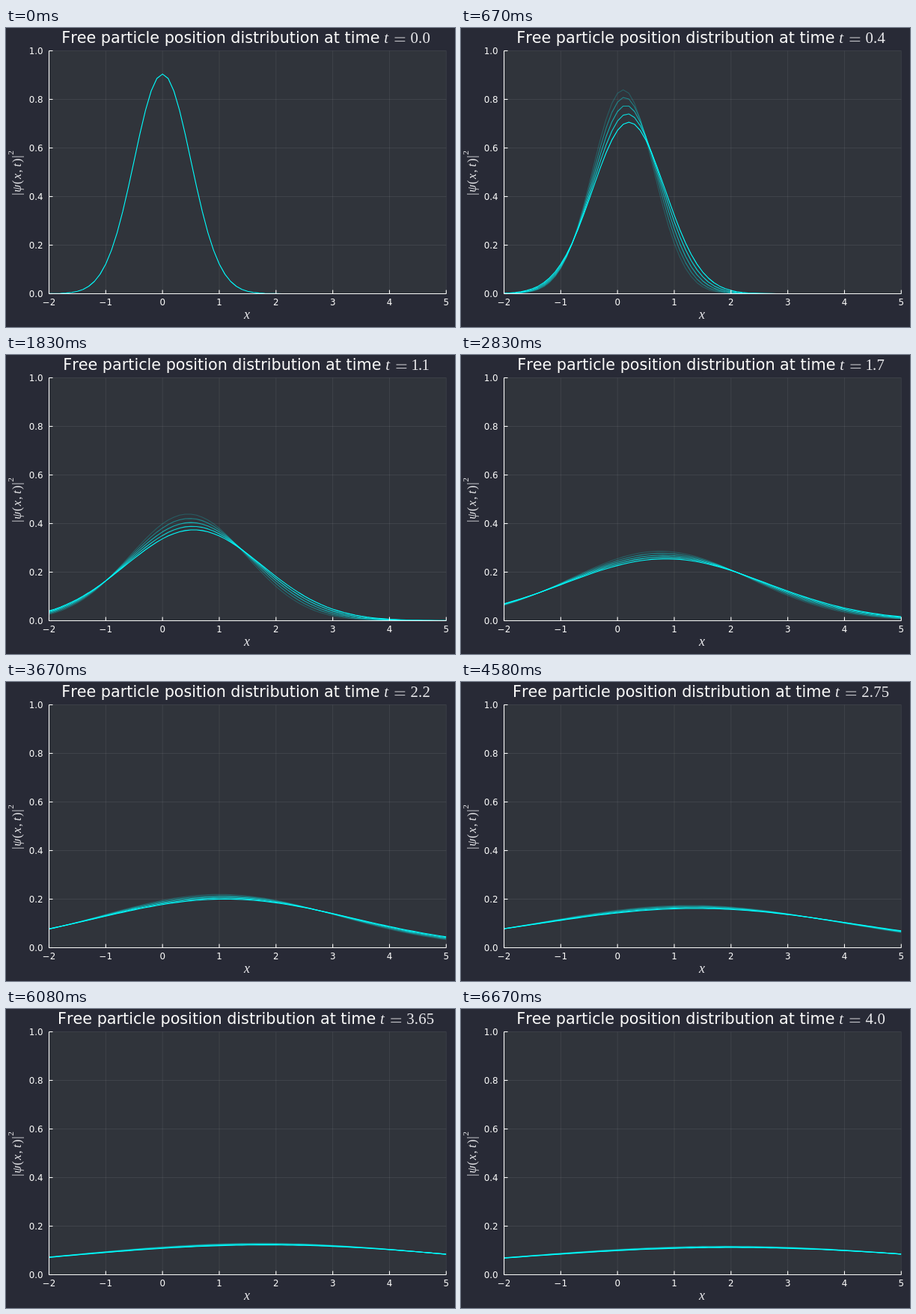
Recreate the animation shown at these times as an HTML page with a canvas. Size 600x400 px, loop 6.76 s.

```html
<!DOCTYPE html>
<html lang="en">
<head>
<meta charset="utf-8">
<title>Free particle</title>
<style>
  html, body { margin: 0; width: 100%; height: 100%; overflow: hidden; background: #282a36; }
  canvas { display: block; }
</style>
</head>
<body>
<canvas id="stage" width="600" height="400"></canvas>
<script>
const ctx = document.getElementById('stage').getContext('2d');

const LOOP = 6760, STEPS = 81, DT = 0.05, TRAIL = 5;
const BOX = { left: 57.5, right: 588.3, top: 30.5, bottom: 355.5 };
const INK = '#fbfbfa', MATH_INK = '#e9e9ec', CURVE = '#00ffff';
const SANS = '"DejaVu Sans", sans-serif';
const SERIF = '"Liberation Serif", serif';
const TITLE = 'Free particle position distribution at time ';
const TITLE_SIZE = 20.74, TICK_SIZE = 11.85, GUIDE_SIZE = 16.3;

const px = x => BOX.left + (x + 2) / 7 * (BOX.right - BOX.left);
const py = y => BOX.bottom - y * (BOX.bottom - BOX.top);

// Spreading Gaussian packet with wave number 1/2
const PEAK = Math.sqrt(2 / Math.PI) * Math.exp(1 / 8);
function density(x, t) {
  const spread = 1 + 4 * t * t;
  return PEAK / Math.sqrt(spread) * Math.exp(-2 * (x - t / 2) ** 2 / spread);
}

function line(x1, y1, x2, y2) {
  ctx.beginPath();
  ctx.moveTo(x1, y1);
  ctx.lineTo(x2, y2);
  ctx.stroke();
}

function text(str, x, y, font, align = 'left', color = INK) {
  ctx.font = font;
  ctx.textAlign = align;
  ctx.fillStyle = color;
  ctx.fillText(str, x, y);
}

const roman = size => `${size}px ${SERIF}`;
const italic = size => `italic ${size}px ${SERIF}`;
const xTicks = [-2, -1, 0, 1, 2, 3, 4, 5];
const yTicks = [0, 0.2, 0.4, 0.6, 0.8, 1];

function drawGrid() {
  ctx.fillStyle = '#30343b';
  ctx.fillRect(BOX.left, BOX.top, BOX.right - BOX.left, BOX.bottom - BOX.top);
  ctx.strokeStyle = 'rgba(255,255,255,0.075)';
  ctx.lineWidth = 1;
  for (const x of xTicks) line(px(x), BOX.top, px(x), BOX.bottom);
  for (const y of yTicks) line(BOX.left, py(y), BOX.right, py(y));
}

function drawAxes() {
  ctx.strokeStyle = INK;
  ctx.lineWidth = 1.1;
  line(BOX.left, BOX.top, BOX.left, BOX.bottom);
  line(BOX.left - 0.5, BOX.bottom, BOX.right, BOX.bottom);
  const font = `${TICK_SIZE}px ${SANS}`;
  for (const x of xTicks) {
    line(px(x), BOX.bottom, px(x), BOX.bottom - 5);
    text(String(x).replace('-', '\u2212'), px(x), 371.3, font, 'center');
  }
  for (const y of yTicks) {
    line(BOX.left, py(y), BOX.left + 5, py(y));
    text(y.toFixed(1), 49.6, py(y) + 4.3, font, 'right');
  }
}

function drawGuides() {
  text('x', 322, 388.5, italic(18), 'center', MATH_INK);
  ctx.save();
  ctx.translate(20, 224.5);
  ctx.rotate(-Math.PI / 2);
  const put = (str, em, font) => text(str, em * GUIDE_SIZE, 0, font, 'center', MATH_INK);
  const up = roman(GUIDE_SIZE), slant = italic(GUIDE_SIZE);
  put('|', 0.14, up);
  put('ψ', 0.6, slant);
  put('(', 1.12, up);
  put('x', 1.6, slant);
  put(',', 2.03, up);
  put('t', 2.515, slant);
  put(')', 2.89, up);
  put('|', 3.22, up);
  text('2', 3.54 * GUIDE_SIZE, -10, roman(11.4), 'center', MATH_INK);
  ctx.restore();
}

const advance = ch => ch === '.' ? 0.278 * TITLE_SIZE : 0.5 * TITLE_SIZE - (ch === '1' ? 2 : 0);

function drawTitle(step) {
  const t = step / 20;
  const digits = [...(Number.isInteger(t) ? t.toFixed(1) : String(t))];
  const font = `${TITLE_SIZE}px ${SANS}`;
  const base = 20.4, equalsAt = 14.3, digitsAt = 35.2;
  ctx.font = font;
  const words = ctx.measureText(TITLE).width;
  const total = words + digitsAt + digits.reduce((sum, ch) => sum + advance(ch), 0);
  let x = 321 - total / 2;
  text(TITLE, x, base, font);
  x += words - 0.8;
  text('t', x, base, italic(TITLE_SIZE), 'left', MATH_INK);
  ctx.fillRect(x + equalsAt, base - 7.9, 13.8, 0.9);
  ctx.fillRect(x + equalsAt, base - 3.2, 13.8, 0.9);
  x += digitsAt;
  for (const ch of digits) {
    const w = advance(ch);
    text(ch, x + w / 2, base, roman(TITLE_SIZE), 'center', MATH_INK);
    x += w;
  }
}

function drawCurve(t, alpha) {
  ctx.globalAlpha = alpha;
  ctx.beginPath();
  for (let i = -20; i <= 50; i++) ctx.lineTo(px(i / 10), py(density(i / 10, t)));
  ctx.stroke();
  ctx.globalAlpha = 1;
}

function drawCurves(step) {
  ctx.save();
  ctx.beginPath();
  ctx.rect(BOX.left, BOX.top, BOX.right - BOX.left, BOX.bottom - BOX.top + 0.5);
  ctx.clip();
  ctx.strokeStyle = CURVE;
  ctx.lineWidth = 1.1;
  ctx.lineJoin = 'round';
  for (let age = Math.min(step, TRAIL - 1); age >= 0; age--) {
    drawCurve((step - age) * DT, 1 - age / TRAIL);
  }
  ctx.restore();
}

// Twelve steps per second, each start rounded to 10 ms
const startOf = step => Math.round(step * 25 / 3) * 10;

function stepAt(ms) {
  let step = STEPS - 1;
  while (step > 0 && startOf(step) > ms) step--;
  return step;
}

function render(step) {
  ctx.fontKerning = 'none';
  ctx.fillStyle = '#282a36';
  ctx.fillRect(0, 0, 600, 400);
  drawGrid();
  drawCurves(step);
  drawAxes();
  drawGuides();
  drawTitle(step);
}

const began = performance.now();
function tick() {
  render(stepAt((performance.now() - began) % LOOP));
  requestAnimationFrame(tick);
}
tick();
</script>
</body>
</html>
```
